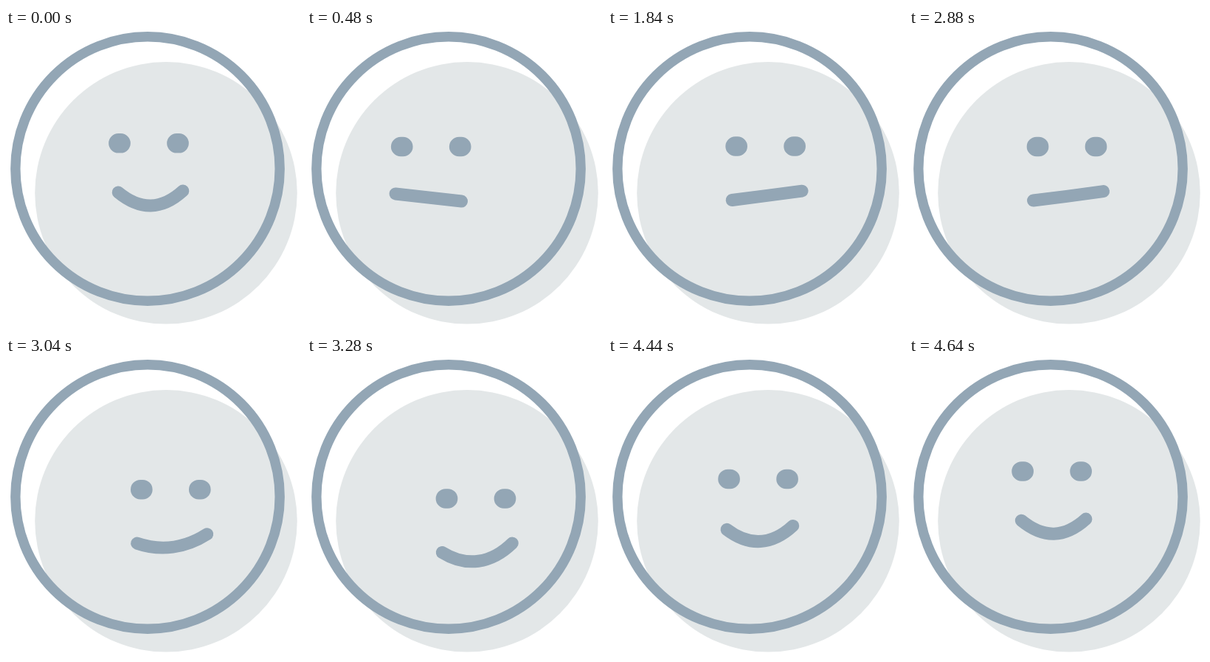
An HTML page that plays this animation: 400x407 px, repeating every 6.64 s.

```html
<!DOCTYPE html>
<html lang="en">
<head>
<meta charset="utf-8">
<title>Looking around</title>
<style>
  html, body { margin: 0; height: 100%; overflow: hidden; background: #fff; }
  svg { display: block; width: 100%; height: 100%; }
  g { fill: none; stroke: #93a6b5; stroke-linecap: round; }
</style>
</head>
<body>
<svg viewBox="0 0 400 407">
  <circle cx="217" cy="223.8" r="177.8" fill="#e3e7e8"/>
  <g>
    <circle cx="192" cy="191" r="179.2" stroke-width="13.4"/>
    <path id="eyes" stroke-width="26.5"/>
    <path id="mouth" stroke-width="17"/>
  </g>
</svg>
<script>
  const LOOP = 6640, STEP = 40, MOVE = 420, EYE_GAP = 79;

  // Each pose: eye centre x, y, then the four Bezier points of the mouth.
  const line = (x1, y1, x2, y2) => [
    x1, y1,
    x1 + (x2 - x1) / 3, y1 + (y2 - y1) / 3,
    x2 - (x2 - x1) / 3, y2 - (y2 - y1) / 3,
    x2, y2
  ];
  const home = [154, 156.3, 152.2, 223, 182, 247.6, 211, 247.1, 239.8, 221];
  const left = [128.7, 161, ...line(120, 225, 209.5, 235)];
  const right = [174.3, 160.5, ...line(168.3, 233.5, 263.3, 221.1)];
  const down = [189.5, 193.5, 183.3, 266.5, 216, 286.8, 250, 281.8, 278.3, 254];

  const moves = [[38, left], [1444, right], [2877, down], [4244, home]];
  const easeOut = p => p * (2 - p);
  const eyes = document.getElementById("eyes");
  const mouth = document.getElementById("mouth");

  function poseAt(t) {
    let pose = home;
    for (const [start, next] of moves) {
      if (t < start) break;
      const k = easeOut(Math.min(1, (t - start) / MOVE));
      pose = pose.map((v, i) => v + (next[i] - v) * k);
    }
    return pose;
  }

  function draw() {
    const t = Math.floor(performance.now() % LOOP / STEP) * STEP;
    const [x, y, mx, my, ...curve] = poseAt(t);
    const eye = cx => `M${cx - 1.6} ${y}h3.2`;
    eyes.setAttribute("d", eye(x) + eye(x + EYE_GAP));
    mouth.setAttribute("d", `M${mx} ${my}C${curve.join(" ")}`);
    requestAnimationFrame(draw);
  }
  draw();
</script>
</body>
</html>
```
